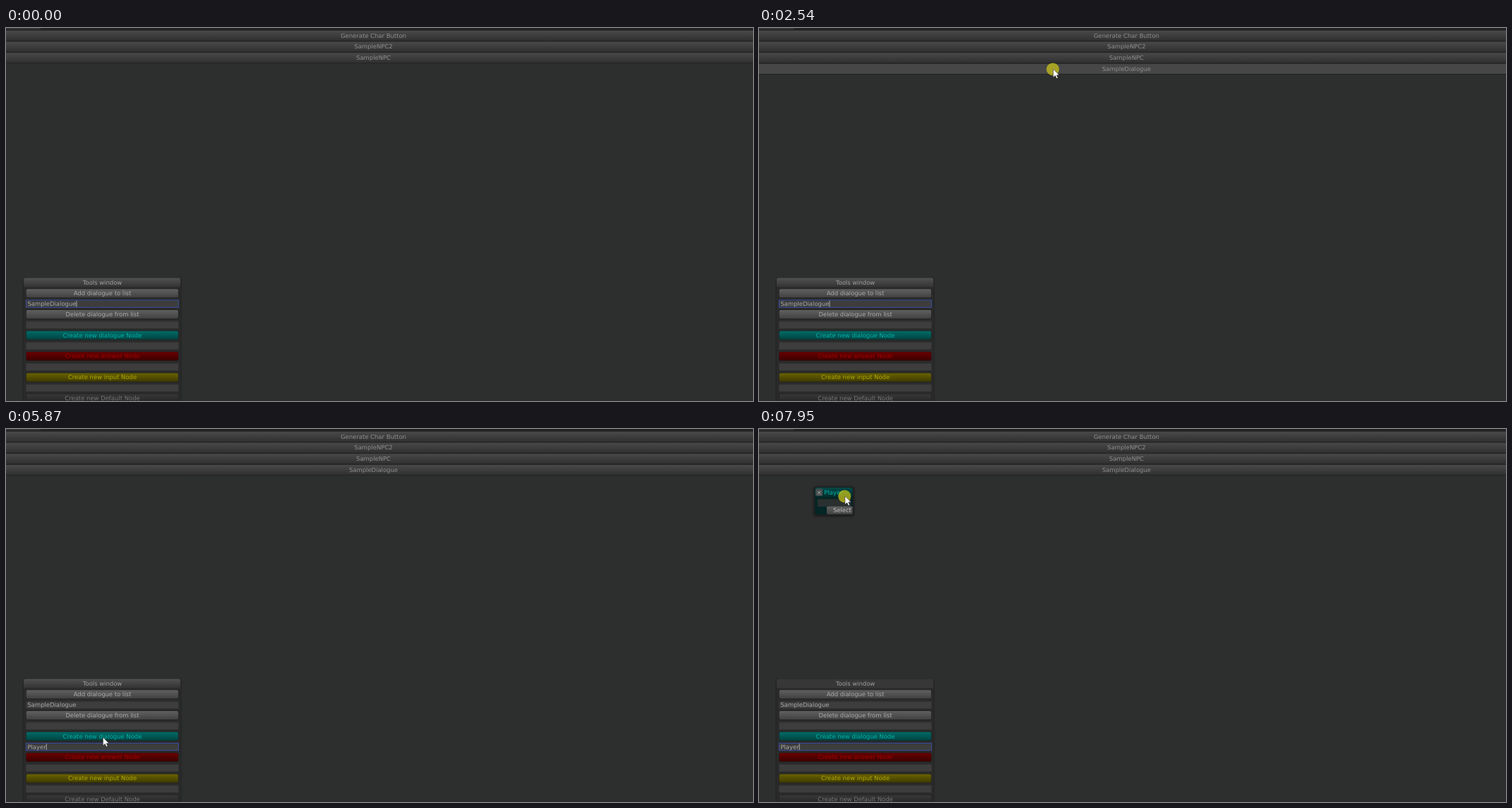
Write an HTML page that moves like this. It is 1058 px wide and 529 px high and loops after 8 s.

```html
<!DOCTYPE html>
<html lang="en">
<head>
<meta charset="utf-8">
<title>Dialogue editor</title>
<style>
html, body { margin: 0; width: 100%; height: 100%; overflow: hidden; background: #2d2e2e; }
svg { display: block; width: 1058px; height: 529px; }
text { font: 8.45px "DejaVu Sans", sans-serif; text-rendering: geometricPrecision; white-space: pre; }
</style>
</head>
<body>
<svg id="stage" viewBox="0 0 1058 529"></svg>
<script>
const NS = 'http://www.w3.org/2000/svg';
const LOOP = 8000;
const STEP = 77;
const stage = document.getElementById('stage');

function el(parent, tag, attrs, content) {
  const node = document.createElementNS(NS, tag);
  for (const key in attrs) node.setAttribute(key, attrs[key]);
  if (content !== undefined) node.textContent = content;
  parent.append(node);
  return node;
}
const box = (parent, x, y, width, height, fill, more) =>
  el(parent, 'rect', { x, y, width, height, fill, ...more });
// y is the middle of the capitals
const label = (parent, x, y, fill, content, anchor = 'middle') =>
  el(parent, 'text', { x, y: y + 3.1, fill, 'text-anchor': anchor }, content);
const show = (node, on) => node.setAttribute('visibility', on ? 'visible' : 'hidden');

function shadow(parent, x, y, w, h, depth) {
  for (let d = depth; d > 0; d--) {
    box(parent, x - d, y - d + 1, w + 2 * d, h + 2 * d, '#000', { rx: d + 2, opacity: 0.1 });
  }
}

const defs = el(stage, 'defs', {});
function gradient(id, top, bottom) {
  const g = el(defs, 'linearGradient', { id, x1: 0, y1: 0, x2: 0, y2: 1 });
  el(g, 'stop', { offset: 0, 'stop-color': top });
  el(g, 'stop', { offset: 1, 'stop-color': bottom });
  return `url(#${id})`;
}
const rowFill = gradient('row', '#494949', '#303030');
const titleFill = gradient('title', '#515151', '#333333');
const grey = gradient('grey', '#606060', '#414141');
const teal = gradient('teal', '#006b67', '#004341');
const red = gradient('red', '#690000', '#3c0000');
const yellow = gradient('yellow', '#696300', '#3f3b00');
const dim = gradient('dim', '#383838', '#242424');
const nodeTitle = gradient('nodeTitle', '#004a47', '#022e2c');

// Top strip and character rows
box(stage, 0, 0, 1058, 529, '#2d2e2e');
box(stage, 0, 0, 1058, 3, '#222');
box(stage, 0, 0, 49, 2, '#343434');

const rows = ['Generate Char Button', 'SampleNPC2', 'SampleNPC', 'SampleDialogue'].map((name, i) => {
  const mid = 10.4 + 15.67 * i;
  const g = el(stage, 'g', {});
  const face = box(g, -4, mid - 6.4, 1066, 14, rowFill);
  box(g, 0, mid + 7.6, 1058, 1, '#232323');
  label(g, 520.5, mid, '#8f8f8f', name);
  return { g, face };
});
const added = rows[3];

// Tools window: buttons and fields take turns down a fixed pitch
shadow(stage, 25, 354.5, 222, 180, 2);
box(stage, 25, 354.5, 222, 180, '#2a2a2a', { rx: 2.5 });
const toolTitle = box(stage, 25, 354.5, 222, 13, titleFill, { rx: 2.5 });
label(stage, 136.5, 361, '#a0a0a0', 'Tools window');

function button(mid, fill, ink, name) {
  box(stage, 28.2, mid - 6.2, 216.2, 13, '#1f1f1f', { rx: 2.5 });
  const face = box(stage, 28.7, mid - 5.7, 215.2, 12, fill, { rx: 2 });
  label(stage, 136.5, mid, ink, name);
  return face;
}
function field(mid) {
  box(stage, 28.5, mid - 5.1, 215.8, 10.6, '#3d3d3d');
  box(stage, 28.5, mid - 5.1, 215.8, 1, '#303030');
  const ring = box(stage, 28.5, mid - 4.9, 215.8, 10.2, 'none', { stroke: '#3a4ea0' });
  const text = label(stage, 30.4, mid + 0.2, '#ababab', '', 'start');
  const caret = box(stage, 0, mid - 4.2, 0.8, 9, '#c4c4c4');
  return (value, focus) => {
    if (text.textContent !== value) text.textContent = value;
    show(ring, focus);
    show(caret, focus);
    caret.setAttribute('x', 30.5 + (value ? text.getComputedTextLength() : 0));
  };
}
const tools = [
  [grey, '#acacac', 'Add dialogue to list'],
  [grey, '#acacac', 'Delete dialogue from list'],
  [teal, '#00b4ab', 'Create new dialogue Node'],
  [red, '#a10000', 'Create new answer Node'],
  [yellow, '#b3a900', 'Create new input Node'],
  [dim, '#767676', 'Create new Default Node']
].map(([fill, ink, name], i) => {
  const mid = 376 + 29.77 * i;
  const tool = { face: button(mid, fill, ink, name), set: field(mid + 14.88) };
  tool.set('', false);
  return tool;
});
const [addTool, , nodeTool] = tools;

// Dialogue node, laid out from its own top left corner
const node = el(stage, 'g', {});
shadow(node, 0, 0, 53, 38, 4);
box(node, 0, 0, 53, 38, '#042625', { rx: 2.5 });
box(node, 0, 0, 53, 13, nodeTitle, { rx: 2.5 });
box(node, 0.7, 1.6, 10, 10.4, '#454f4e', { rx: 2 });
label(node, 5.6, 6.8, '#b5b5b5', '×');
label(node, 12.8, 7.2, '#00b4ab', 'Player', 'start');
box(node, 3.5, 16, 47, 11, '#2a3030');
box(node, 3.5, 16, 47, 1, '#1d2726');
box(node, 16.5, 26.8, 36.5, 11.2, grey, { rx: 1.5 });
label(node, 25.4, 32.2, '#c0c0c0', 'Select', 'start');

// Pointer
const pointer = el(stage, 'g', {});
const halo = el(pointer, 'circle', { cx: -0.3, cy: 0.4, r: 9, fill: '#d0ca18', opacity: 0.7 });
el(pointer, 'path', {
  d: 'M.4 .3V12L3.2 9.5 5 13.6 6.9 12.8 5.2 8.8H8.8Z',
  fill: '#fff', stroke: '#222', 'stroke-width': 0.5
});

// Each move: start time, number of steps, end point
const moves = [
  [0, 1, 669, 470],
  [70, 8, 150, 352],
  [686, 3, 139, 374.5],
  [990, 1, 136.7, 374.3],
  [1760, 11, 416.4, 58],
  [2850, 7, 152.8, 455],
  [3389, 4, 138, 447.3],
  [4000, 2, 166, 440],
  [5330, 4, 162, 456],
  [5638, 4, 137, 437],
  [6330, 3, 17, 195],
  [6800, 1, 36, 50],
  [6877, 10, 18.5, 14.5],
  [7720, 4, 121.5, 95]
];
const ease = p => p * p * (3 - 2 * p);

function pointerAt(t) {
  const i = moves.findLastIndex(m => t >= m[0]);
  const [start, count, x, y] = moves[i];
  const [, , x0, y0] = moves[Math.max(0, i - 1)];
  const k = Math.floor((t - start + 10) / STEP) + 1;
  const p = ease(Math.min(1, k / count));
  return [x0 + (x - x0) * p, y0 + (y - y0) * p];
}

const within = (t, ...spans) => spans.some(([a, b]) => t >= a && t < b);
const press = { add: [1150, 1300], row: [2540, 2620], field: [3630, 3690], node: [5945, 6100], drag: [7720, LOOP] };
const keys = [4540, 4690, 4860, 5090, 5160, 5330];

function draw(t) {
  const [x, y] = pointerAt(t);
  pointer.setAttribute('transform', `translate(${x} ${y})`);
  show(pointer, within(t, [70, 4460], [4860, 6580], [6800, LOOP]));
  halo.setAttribute('display', within(t, ...Object.values(press)) ? 'inline' : 'none');

  show(added.g, t >= press.add[1]);
  added.face.setAttribute('fill', within(t, press.row) ? '#474747' : rowFill);
  addTool.face.setAttribute('fill', within(t, press.add) ? '#575757' : grey);
  nodeTool.face.setAttribute('fill', within(t, press.node) ? '#005c58' : teal);

  const naming = t >= press.field[0];
  addTool.set('SampleDialogue', !naming);
  nodeTool.set('Player'.slice(0, keys.filter(k => t >= k).length), naming);

  const drag = t >= press.drag[0];
  toolTitle.setAttribute('fill', drag ? '#373737' : titleFill);
  show(node, t >= press.node[1]);
  const [nx, ny] = drag ? [x - 42, y - 12] : [-23.5, 2];
  node.setAttribute('transform', `translate(${nx} ${ny})`);
}

let begin;
function tick(now) {
  if (begin === undefined) begin = now;
  draw((now - begin) % LOOP);
  requestAnimationFrame(tick);
}
draw(0);
requestAnimationFrame(tick);
</script>
</body>
</html>
```
